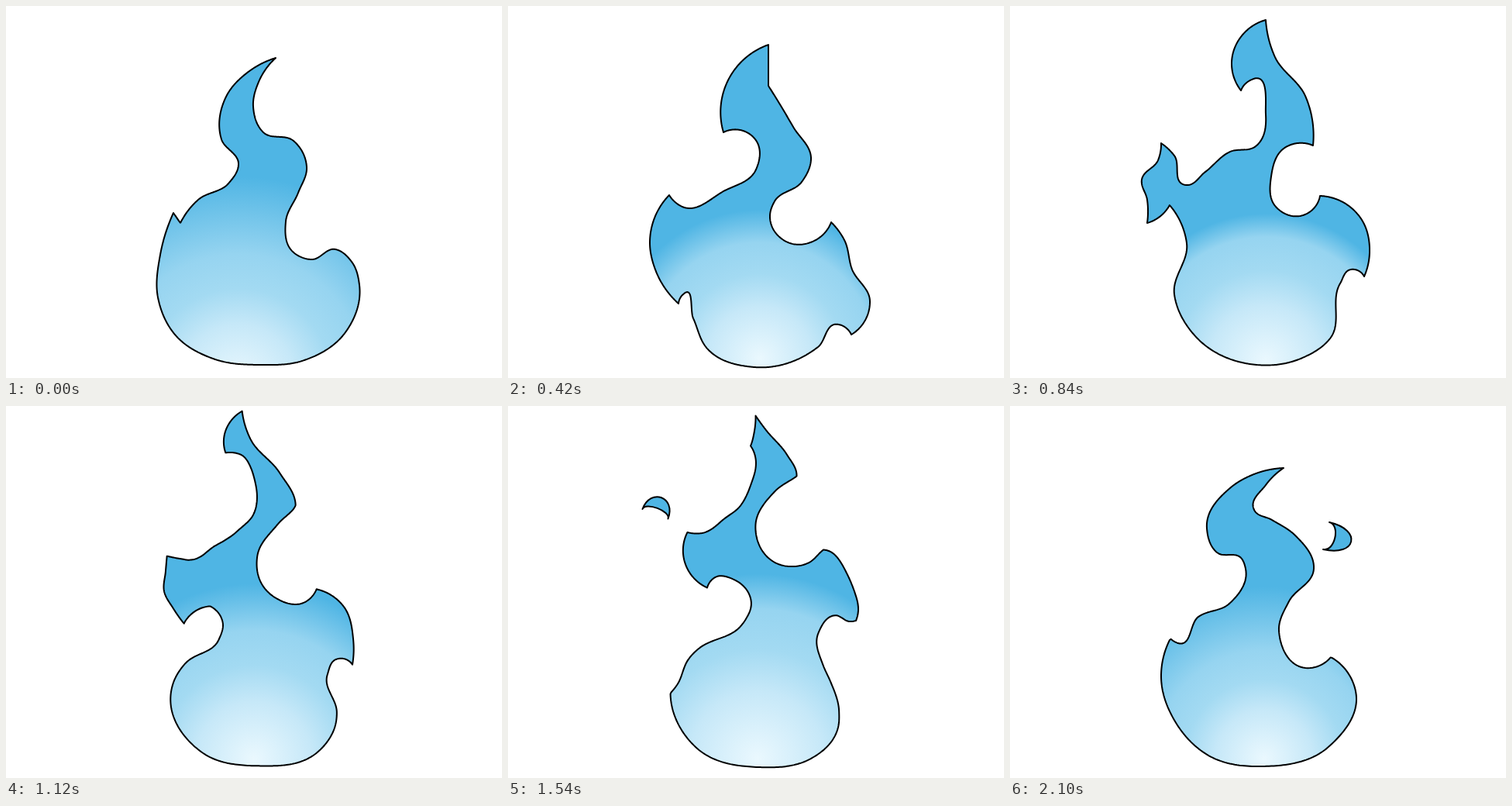
An HTML page with a canvas for the animation above (2240 ms loop, 640x480 px).

```html
<!DOCTYPE html>
<html lang="en">
<head>
<meta charset="utf-8">
<title>Blue flame</title>
<style>
html, body { margin: 0; width: 100%; height: 100%; overflow: hidden; background: #fff; }
canvas { display: block; }
</style>
</head>
<body>
<canvas id="stage" width="640" height="480"></canvas>
<script>
const STEP = 140;
const STEPS = 16;
const SAMPLES = 140;

// Key points of each pose, clockwise from the tip, joined by arcs.
// "/" starts a section that morphs onto the same section of the next pose;
// "!" marks a sharp corner. A pose rests from step "at" to step "until".
// glow: centre x, centre y, radius of the light core, radius where it ends.
const poses = [
  { at: 0, until: 0, glow: [300, 485, 165, 265], line: `
    348,67! 326,98 319,130 332,163 371,174 / 388,208 377,241 361,278 370,317 394,327 /
    425,314 446,330 / 456,360 438,421 382,458 / 328,463 270,456 218,424 / 196,376 199,321 /
    216,267! 225,280! 248,250 287,229 300,205 / 278,172 284,117 314,84` },
  { at: 3, until: 3, glow: [325, 455, 150, 192], line: `
    336,50! 336,103! 368,156 / 391,198 379,227 344,252 338,270 359,304 397,302 /
    417,279! 434,302 444,340 467,381 / 443,424! 427,411 400,440 / 318,466 257,442 239,403 225,373 /
    220,384! 190,340 183,305 / 208,244! 221,257 280,238 320,211 319,172 / 278,163! 282,100` },
  { at: 4, until: 4, glow: [370, 485, 115, 182], line: `
    348,42! 342,88 386,134 / 407,192 395,208 371,210 350,262 377,297 412,290 /
    428,273! 466,312 483,356 / 464,403! 445,389 430,408 405,443 / 318,465 262,443 242,400 240,366 220,344 /
    224,366! 191,334 182,280 206,241 / 228,218! 241,245 305,211 348,172 / 317,148 299,105 318,63` },
  { at: 6, until: 6, glow: [330, 458, 160, 190], line: `
    330,18! 342,66 381,116 / 391,180! 356,182 337,220 343,259 378,270 /
    400,245! 452,273 464,318 / 457,349! 440,340 426,358 413,429 375,455 /
    318,463 240,427 212,372 228,306 206,257! 193,272 / 177,280! 177,250 170,224 191,199 /
    195,177! 212,193 227,231 252,214 284,188 317,181 330,140 308,97 / 298,109! 286,75 305,32` },
  { at: 9, until: 10, glow: [315, 455, 170, 245], line: `
    292,1! 302,31 339,70 / 365,102 347,139 318,180 345,238 386,247 /
    401,232! 430,254 440,295 / 442,326! 420,320 409,341 430,390 408,446 /
    328,465 250,449 211,370 238,326 299,304 310,280 279,258 / 256,281! 219,243 /
    214,202! 237,198 272,167 307,148 321,95 / 276,36! 282,16` },
  { at: 12, until: 13, glow: [325, 455, 205, 235], line: `
    347,24! 374,41 / 380,79! 350,78 321,128 354,172 394,156 / 413,139 440,170 /
    456,228 447,235 424,220 391,245 390,295 430,366 436,393 400,449 /
    318,467 238,435 209,368 209,354! 226,348 240,315 306,261 318,230 296,190 268,177 / 258,188! 236,160 /
    249,124! 264,132 309,88 336,77 / 350,67 355,48` },
  { at: 15, until: 15, glow: [328, 455, 140, 222], line: `
    353,80! / 330,102 315,134 338,147 / 368,167 /
    392,210 360,252 347,290 388,338 414,324! 446,368 412,439 /
    325,465 258,452 213,407 195,350 207,300! 214,305 243,272 283,255 304,210 299,197 / 267,189 /
    254,158 285,105 / 310,90` }
];

// Sparks that break off: both tips (x, y, x, y) and the height of the bulge
const sparks = [
  { at: 9, until: 10, shape: [163, 182, 210, 194, 36] },
  { at: 12, until: 13, shape: [184, 84, 203, 97, 9] },
  { at: 14, until: 14, shape: [350, 6, 376, 55, 14] },
  { at: 15, until: 15, shape: [412, 150, 404, 185, 33] }
];

const lerp = (a, b, t) => a + (b - a) * t;
const blend = (a, b, t) => a.map((v, i) => lerp(v, b[i], t));
const minus = (a, b) => [a[0] - b[0], a[1] - b[1]];
const dot = (a, b) => a[0] * b[0] + a[1] * b[1];
const unit = v => v.map(c => c / Math.hypot(...v));
const mirror = (v, axis) => axis.map((c, i) => 2 * dot(v, axis) * c - v[i]);

// Keys around a step, and how far it has moved on from the first of them
function locate(keys, step) {
  const i = keys.findLastIndex(key => key.at <= step);
  const from = keys[i], to = keys[i + 1] || from;
  const progress = start => step <= start ? 0 : (step - start) / (to.at - start);
  return from && { from, to, mix: progress(from.until), drift: progress(from.at) };
}

function parse(line) {
  return line.split('/').flatMap(section =>
    section.trim().split(/\s+/).map((token, i) => ({
      pos: token.replace('!', '').split(',').map(Number),
      corner: token.endsWith('!'),
      start: i === 0
    })));
}

// Near-circular arcs through the points, as one polyline per section
function sections(line) {
  const points = parse(line), n = points.length;
  const chords = points.map((p, i) => {
    const v = minus(points[(i + 1) % n].pos, p.pos);
    return { length: Math.hypot(...v), dir: unit(v) };
  });
  const tangents = points.map((p, i) => {
    const before = chords[(i + n - 1) % n], after = chords[i];
    return unit(blend(before.dir, after.dir, before.length / (before.length + after.length)));
  });
  const result = [];
  points.forEach((p, i) => {
    const j = (i + 1) % n, q = points[j], { length, dir } = chords[i];
    const bothSharp = p.corner && q.corner;
    const leave = bothSharp ? dir : p.corner ? mirror(tangents[j], dir) : tangents[i];
    const arrive = bothSharp ? dir : q.corner ? mirror(tangents[i], dir) : tangents[j];
    const pull = tangent => 2 * length / (1 + Math.max(0, dot(tangent, dir)));
    if (p.start) result.push([p.pos]);
    for (let s = 1; s <= 24; s++) {
      const u = s / 24, v = 1 - u;
      const a = u * v * v * pull(leave), b = u * u * v * pull(arrive);
      result.at(-1).push(blend(p.pos, q.pos, u * u * (3 - 2 * u))
        .map((c, axis) => c + a * leave[axis] - b * arrive[axis]));
    }
  });
  return result;
}

// Evenly spaced points along a polyline
function resample(poly) {
  const along = [0];
  for (let i = 1; i < poly.length; i++) {
    along.push(along[i - 1] + Math.hypot(...minus(poly[i], poly[i - 1])));
  }
  let i = 0;
  return Array.from({ length: SAMPLES }, (_, k) => {
    const d = along.at(-1) * k / SAMPLES;
    while (along[i + 1] < d) i++;
    return blend(poly[i], poly[i + 1], (d - along[i]) / (along[i + 1] - along[i]));
  });
}

for (const pose of poses) pose.outline = sections(pose.line).flatMap(resample);

function addSpark(path, [x1, y1, x2, y2, bulge]) {
  const [dx, dy] = unit([x2 - x1, y2 - y1]);
  const curve = (ax, ay, bx, by, height) => {
    const ox = dy * height * 4 / 3, oy = -dx * height * 4 / 3;
    path.bezierCurveTo(ax + ox, ay + oy, bx + ox, by + oy, bx, by);
  };
  path.moveTo(x1, y1);
  curve(x1, y1, x2, y2, bulge);
  curve(x2, y2, x1, y1, bulge * 0.35);
  path.closePath();
}

const ctx = document.getElementById('stage').getContext('2d');

function makeGlow([x, y, core, edge]) {
  const gradient = ctx.createRadialGradient(x, y, 0, x, y, edge);
  gradient.addColorStop(0, '#eaf8fe');
  gradient.addColorStop(0.45 * core / edge, '#c6e8f8');
  gradient.addColorStop(0.73 * core / edge, '#a3daf2');
  gradient.addColorStop(core / edge, '#96d4f0');
  gradient.addColorStop(1, '#4fb5e4');
  return gradient;
}

const pictures = Array.from({ length: STEPS }, (_, step) => {
  const path = new Path2D();
  const { from, to, mix, drift } = locate(poses, step);
  from.outline.forEach((p, i) => path.lineTo(...blend(p, to.outline[i], mix)));
  path.closePath();
  const spark = locate(sparks, step);
  if (spark) addSpark(path, blend(spark.from.shape, spark.to.shape, spark.mix));
  return { path, fill: makeGlow(blend(from.glow, to.glow, drift)) };
});

ctx.lineWidth = 2;
ctx.lineJoin = 'round';

function draw(time) {
  const { path, fill } = pictures[Math.floor(time / STEP) % STEPS];
  ctx.fillStyle = '#fff';
  ctx.fillRect(0, 0, 640, 480);
  ctx.fillStyle = fill;
  ctx.fill(path);
  ctx.stroke(path);
}

const begin = performance.now();
function tick() {
  draw(performance.now() - begin);
  requestAnimationFrame(tick);
}
tick();
</script>
</body>
</html>
```
